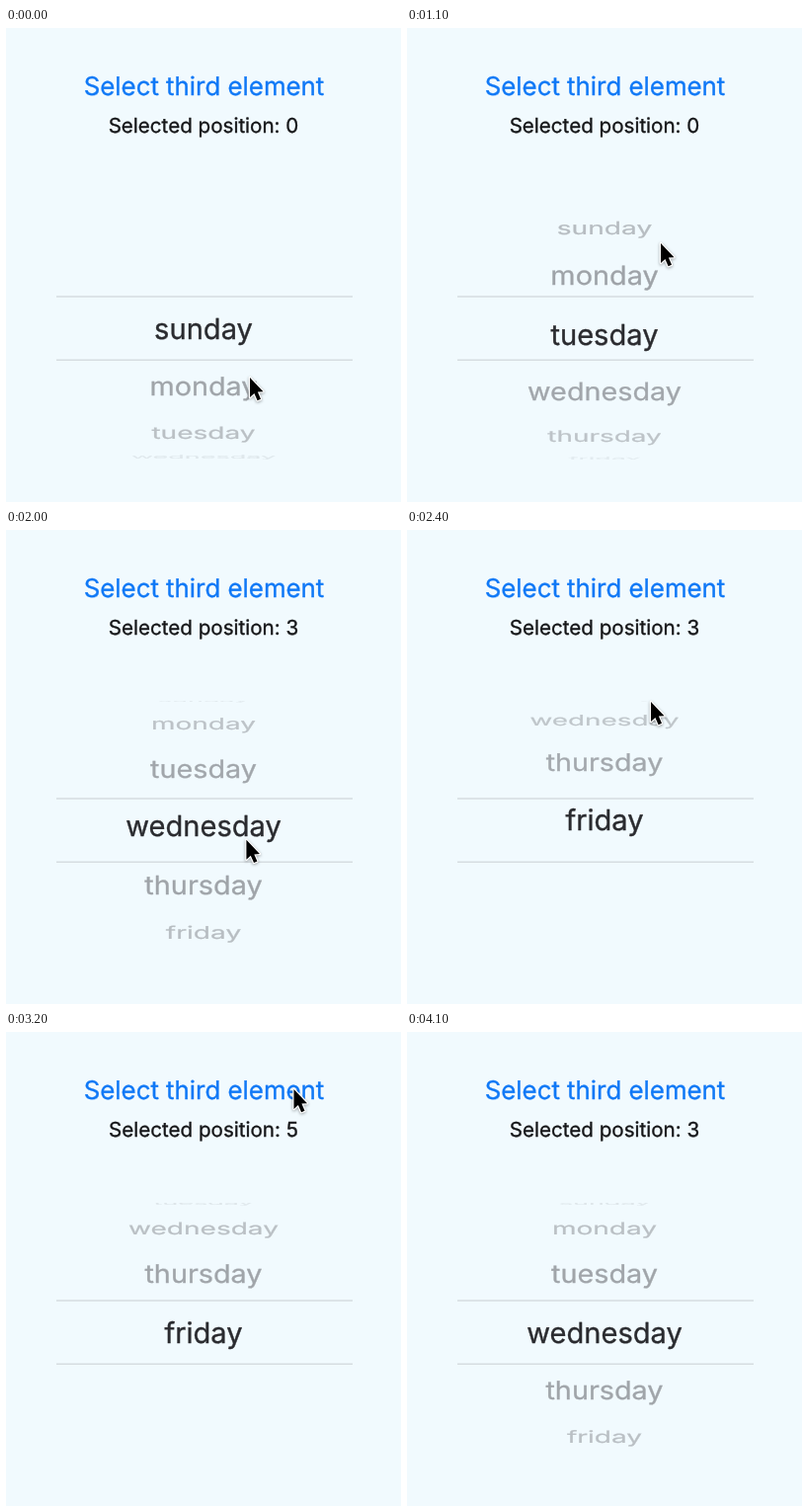
Animation of 400 by 480 pixels, one loop 4600 ms. Source, as an HTML page:

```html
<!DOCTYPE html>
<html lang="en">
<head>
<meta charset="utf-8">
<title>Wheel picker</title>
<style>
  html, body { margin: 0; width: 100%; height: 100%; overflow: hidden; background: #f1fafe; }
  svg { display: block; width: 400px; height: 480px; }
  text {
    font-family: Inter, Roboto, sans-serif; text-anchor: middle; text-rendering: geometricPrecision;
    fill: var(--ink); stroke: var(--ink); stroke-width: .35px;
  }
  #button { --ink: #0f78f6; font-size: 25.85px; }
  #label { --ink: #151618; font-size: 20.6px; }
  .days { font-size: 29.1px; }
  .rim { --ink: #1c1a20; }
  .band { --ink: #2a2b2f; }
  #cursor { filter: drop-shadow(0 1.5px 1.5px rgba(0, 0, 0, .35)); }
</style>
</head>
<body>
<svg viewBox="0 0 400 480">
  <defs>
    <clipPath id="bandClip"><rect x="0" y="272" width="400" height="64"/></clipPath>
    <clipPath id="rimClip"><path d="M0 173H400V272H0ZM0 336H400V437H0Z"/></clipPath>
  </defs>
  <text id="button" x="200.5" y="68.1">Select third element</text>
  <text id="label" x="200" y="106.3"></text>
  <g class="days rim" clip-path="url(#rimClip)"></g>
  <g class="days band" clip-path="url(#bandClip)"></g>
  <path d="M51 272H351M51 336.2H351" stroke="#d6dde1" stroke-width="1.6"/>
  <path id="cursor" d="M0 0V20L4.4 15.9L7.6 23.2L11 21.8L7.9 14.6L13.5 14.2Z"
        fill="#000" stroke="#fff" stroke-width="2.4" paint-order="stroke" stroke-linejoin="round"/>
</svg>
<script>
const LOOP = 4600, STEP = 100;
const CENTER = 304, RADIUS = 133, ROW_ANGLE = 26.3 * Math.PI / 180, DEPTH = 1375, BASELINE = 10.6;
const ROW = 61; // pointer travel per row
const DAYS = ['sunday', 'monday', 'tuesday', 'wednesday', 'thursday', 'friday'];

// Pointer stops: time, x, y
const STOPS = [
  [0, 247, 354], [300, 245, 354], [700, 248, 275], [1100, 257, 218], [1500, 269, 151],
  [1900, 243, 330], [2400, 247, 174], [2700, 247, 174], [3200, 291.5, 58]
];

const $ = id => document.getElementById(id);
const progress = (t, from, to) => Math.min(1, Math.max(0, (t - from) / (to - from)));
const smooth = p => p * p * (3 - 2 * p);
const ease = (t, from, to) => smooth(progress(t, from, to));

// Steady during the first long drag, eased afterwards.
function pointer(t) {
  const i = Math.max(1, STOPS.findIndex(s => s[0] > t));
  if (t >= STOPS.at(-1)[0]) return STOPS.at(-1).slice(1);
  const a = STOPS[i - 1], b = STOPS[i];
  const p = progress(t, a[0], b[0]), k = t < 1500 ? p : smooth(p);
  return [1, 2].map(n => a[n] + (b[n] - a[n]) * k);
}

// Rows scrolled by a drag that takes hold at grabY and ends at releaseTime.
function dragged(t, grabY, releaseTime) {
  return Math.max(0, (grabY - pointer(Math.min(t, releaseTime))[1]) / ROW);
}

function wheel(t) {
  if (t >= 3400) return 5 - 2 * ease(t, 3400, 3900);
  if (t < 1900) return dragged(t, 334, 1500);
  const position = 3 + dragged(t, 318, 2400);
  const excess = Math.max(0, position - 5);
  const stretch = .5 * (1 - ease(t, 2500, 3000));
  return position - excess + excess * stretch;
}

function selected(t) {
  if (t < 1800) return 0;
  return t >= 3000 && t < 3500 ? 5 : 3;
}

const [rim, band] = [...document.querySelectorAll('.days')].map(group => DAYS.map(day => {
  const node = document.createElementNS('http://www.w3.org/2000/svg', 'text');
  node.textContent = day;
  node.setAttribute('y', BASELINE);
  return group.appendChild(node);
}));

function turnWheel(position) {
  DAYS.forEach((_, i) => {
    const angle = (i - position) * ROW_ANGLE, cos = Math.cos(angle);
    const visible = Math.abs(angle) < Math.PI / 2;
    const scale = DEPTH / (DEPTH + RADIUS * (1 - cos));
    const y = CENTER + RADIUS * Math.sin(angle);
    for (const node of [rim[i], band[i]]) {
      node.style.display = visible ? '' : 'none';
      node.setAttribute('transform', `matrix(${scale} 0 0 ${scale * cos} 200 ${y})`);
    }
    rim[i].style.opacity = .42 * Math.max(0, cos);
  });
}

function draw(t) {
  turnWheel(wheel(t));
  $('button').style.opacity = t < 3400 ? 1 : .3 + .7 * ease(t, 3400, 3800);
  $('label').textContent = 'Selected position: ' + selected(t);
  $('cursor').setAttribute('transform', `translate(${pointer(t)})`);
  $('cursor').style.display = t < 4100 ? '' : 'none';
}

const start = performance.now();
function tick() {
  const t = (performance.now() - start) % LOOP;
  draw(Math.floor(t / STEP) * STEP);
  requestAnimationFrame(tick);
}
tick();
</script>
</body>
</html>
```
